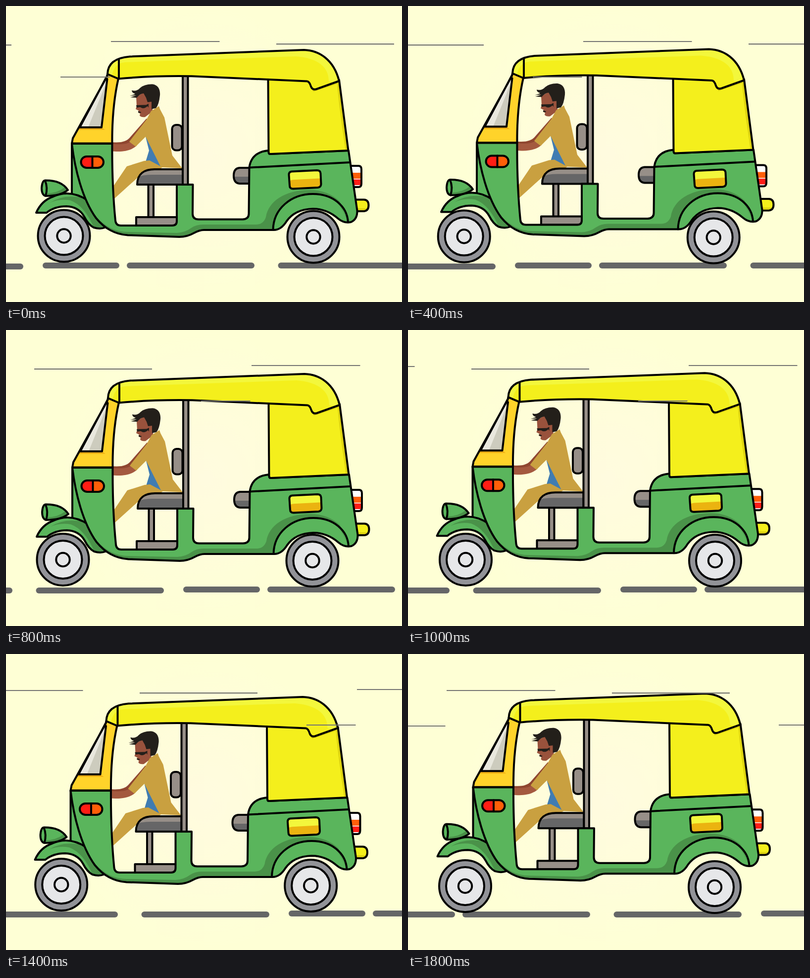
Write an HTML page that moves like this. It is 800 by 600 pixels and loops after 2000 ms.

```html
<!DOCTYPE html>
<html lang="en">
<head>
<meta charset="utf-8">
<title>Auto rickshaw</title>
<style>
  html, body { margin: 0; width: 100%; height: 100%; overflow: hidden; background: #feffd5; }
  svg { display: block; width: 800px; height: 600px; }
  .ink { stroke: #000; stroke-width: 4; stroke-linejoin: round; stroke-linecap: round; }
  .line { fill: none; }
  .green { fill: #5ab55c; }
  .moss { fill: #4a9249; }
  .yellow { fill: #f4ef1c; }
  .lemon { fill: #f3f73c; }
  .mustard { fill: #ded410; }
  .gray { fill: #978f88; }
  .dark { fill: #666667; }
  .skin { fill: #a4593f; }
  .face { fill: #99523c; }
  .shade { fill: #8f4630; }
  .khaki { fill: #c9a040; }
  .hair { fill: #231f1a; }
</style>
</head>
<body>
<svg viewBox="0 0 800 600">
  <defs>
    <radialGradient id="glow" gradientUnits="userSpaceOnUse" cx="400" cy="300" r="300">
      <stop offset="0" stop-color="#fffbdf"/>
      <stop offset="1" stop-color="#feffd5"/>
    </radialGradient>
    <path id="tail" d="M694 324H712Q718 324 718 331V360Q718 367 712 367H698Z"/>
    <path id="fender" d="M61 419Q72 394 96 386Q130 371 165 394L200 449Q190 453 177 449Q166 443 158 427Q147 407 122 406Q98 406 82 419Z"/>
    <path id="lamp" d="M79 353.500Q112 353 125 373Q110 385 80 385Q72 383 72 369Q73 354 79 353.500Z"/>
    <path id="seat" d="M265 362Q265 346 275 338Q284 331 300 331H357V362Z"/>
    <path id="bench" d="M494 328H472Q460 329 460 344T472 360H494Z"/>
    <path id="hull" d="M133 279H214.500Q214 365 221 435Q222 445 232 445H336Q345 445 345 436V362H377.500L377 421Q377 432.500 389 432.500H478Q490.500 432 490.500 421L491.500 327Q496 296 530 293L532 300L692 293L709.500 415Q710 432 697 438Q683 441 671 431Q648 411 620 411Q584 412 567 436Q556 454 541 454H400Q391 454 380 460Q366 468 350 468L246 464.500Q208 462 182 430C154 391 139 330 133 279Z"/>
    <path id="hatch" d="M577 335.500L628 333Q635 333 635.500 339L636.500 361Q636.500 367 630 368L580 370.500Q573 370.500 573 364L571.500 342Q571.500 336 577 335.500Z"/>
    <rect id="signal" x="151.500" y="305" width="45.500" height="23" rx="11.500"/>
    <path id="cover" d="M529.500 146L530.500 296Q530.500 300 534 300L691.500 293L673 150Z"/>
    <path id="roof" d="M205 138Q206 106 250 102.500L602 89C632 90 662 108 673 152L627 168.500Q619 171 616 163Q613 153 608 152.500L375 142.300Q298 141 227 147.500Z"/>
    <clipPath id="inTail"><use href="#tail"/></clipPath>
    <clipPath id="inFender"><use href="#fender"/></clipPath>
    <clipPath id="inLamp"><use href="#lamp"/></clipPath>
    <clipPath id="inSeat"><use href="#seat"/></clipPath>
    <clipPath id="inBench"><use href="#bench"/></clipPath>
    <clipPath id="inHull"><use href="#hull"/></clipPath>
    <clipPath id="inHatch"><use href="#hatch"/></clipPath>
    <clipPath id="inSignal"><use href="#signal"/></clipPath>
    <clipPath id="inRoof"><use href="#roof"/></clipPath>
    <g id="wheel" class="ink">
      <circle r="52.500" fill="#929398"/>
      <circle r="38.500" fill="#e6e7e9"/>
      <circle r="13.700" fill="#e6e7e9"/>
    </g>
  </defs>
  <rect width="800" height="600" fill="url(#glow)"/>
  <g id="road" stroke="#656667" stroke-width="12" stroke-linecap="round"></g>

  <g id="cab">
    <!-- tail lights -->
    <use href="#tail" fill="#fff"/>
    <g clip-path="url(#inTail)">
      <path d="M690 338H720V350H690Z" fill="#ff5f0a"/>
      <path d="M690 351.500H720V363H690Z" fill="#ff1d17"/>
    </g>
    <use href="#tail" class="ink line"/>
    <path class="ink yellow" d="M704 392.500H723Q732.500 393 732.500 404T723 416H704Z"/>
    <path class="mustard" d="M709 410H729Q726 414 722 414H709Z"/>

    <!-- nose, fender and head lamp -->
    <path class="ink green" d="M133 279V384L165 396V330Z"/>
    <use href="#fender" class="green"/>
    <path class="moss" clip-path="url(#inFender)" d="M88 399Q112 383 145 387L170 392L205 455H180Q160 405 130 394Q108 390 88 399Z"/>
    <use href="#fender" class="ink line"/>
    <use href="#lamp" class="green"/>
    <path class="moss" clip-path="url(#inLamp)" d="M82 380Q104 379 118 368L128 373L110 388H80Z"/>
    <use href="#lamp" class="ink line"/>
    <path class="ink line" stroke-width="3" d="M79 354Q85 369 80 385"/>

    <!-- driver -->
    <path d="M282 265L301 292L314 328L282 316L289 293Z" fill="#407cb2"/>
    <path class="khaki" d="M215 368L244 325L279 314L290 313L316 327L300 337L268 346L215 394Z"/>
    <path class="skin" d="M212 276C235 279 244 275 252 267L264 283C250 296 228 296 212 294Z"/>
    <path class="shade" d="M212 276C234 278 243 274 249 268L284 228L287 233L256 273Q240 284 212 279Z"/>
    <path class="face" d="M263 184L281 174L296 192V214L289 219L281 225Q273 226 270 222L271 218L267 216L268 212L262 209L264 203Z"/>
    <path class="khaki" d="M293 213L309 203L311 209L320 226L336 303L356 329L313 327L282 265L262 285L249 275L284 230Z"/>
    <path class="hair" d="M254 171Q264 174 271 166Q280 158 296 158.500C307 160 312 169 311 181Q309 200 303 207L294 209V194L286 195L283 186L278 177Q270 178 264 186L251 185Q259 183 263 181L250 182Q258 180 261 178Q254 176 254 171Z"/>
    <path class="hair" d="M263 201L283 200.500L288 198L288 206L286 203Q281 208 275 207L271 205L264 206Z"/>
    <path class="hair" d="M267 213L273 215L272 217L267 216Z"/>

    <!-- front seat and pillar -->
    <path class="ink gray" d="M287.500 360H298V430H287.500Z"/>
    <path class="ink gray" d="M263 428H346V445H263Z"/>
    <use href="#seat" class="gray"/>
    <path class="dark" clip-path="url(#inSeat)" d="M260 350Q272 342 295 342H360V366H260Z"/>
    <use href="#seat" class="ink line"/>
    <rect class="ink gray" x="335.500" y="241" width="20" height="51.500" rx="8"/>
    <path class="ink gray" d="M357 140H367.500V362H357Z"/>

    <!-- rear bench -->
    <use href="#bench" class="gray"/>
    <path class="dark" clip-path="url(#inBench)" d="M455 346H496V364H455Z"/>
    <use href="#bench" class="ink line"/>

    <!-- hull -->
    <use href="#hull" class="green"/>
    <path class="moss" clip-path="url(#inHull)" d="M180 424Q208 458 246 458L345 460Q362 459 374 450Q384 443 398 443H505Q520 443 525 428C530 396 563 373 614 373Q650 373 674 396L691 438L685 425Q668 381 620 381C576 381 540 411 539 456L400 480H220Z"/>
    <use href="#hull" class="ink line"/>
    <path class="ink line" d="M491.500 327.500L694 317M539.500 454C540 411 576 381 620 381C661 381 689 406 691 438"/>
    <use href="#hatch" class="lemon"/>
    <path clip-path="url(#inHatch)" d="M570 358Q572 352 585 352L640 349V374H570Z" fill="#ebb310"/>
    <use href="#hatch" class="ink line"/>

    <!-- turn signal -->
    <use href="#signal" fill="#ff5f08"/>
    <path clip-path="url(#inSignal)" d="M150 304H174.500V330H150Z" fill="#ff1d14"/>
    <use href="#signal" class="ink line"/>
    <path class="ink line" d="M174.500 305V328"/>

    <!-- windscreen -->
    <path d="M205 138L227 147Q214 204 214.500 278.500H133L135 268L204 143Z" fill="#ffd32a"/>
    <path d="M147 247H194L200 251H145Z" fill="#efae12"/>
    <path d="M204 143L149 246H193L205 150Z" fill="#e9e8de"/>
    <path d="M204 152L166 246H193Z" fill="#cdccbe"/>
    <path class="ink line" d="M205 140L149 246H193L204.500 148M205 138L227 147Q214 204 214.500 278.500H133L135 268L204 143Z"/>

    <!-- rear cover -->
    <use href="#cover" class="yellow"/>
    <path class="mustard" d="M616 164L621 174L669 158Q672 200 686 293H691L673 150Z"/>
    <use href="#cover" class="ink line"/>

    <!-- roof -->
    <use href="#roof" class="yellow"/>
    <path class="lemon" clip-path="url(#inRoof)" d="M200 142V95L610 82L680 110V158L652 153Q652 108 586 102L240 114Q218 116 214 142Z"/>
    <use href="#roof" class="ink line"/>
    <path class="ink line" d="M228 108V147"/>
  </g>

  <g id="wheels">
    <use href="#wheel" x="117" y="466"/>
    <use href="#wheel" x="621" y="468"/>
  </g>
  <g id="wind" stroke="#757573" stroke-width="2.200"></g>
</svg>
<script>
  const $ = id => document.getElementById(id);
  const STEP = 200, SHIFT = 71, TILE = 773;

  // [cab x, cab y, wheels x, wheels y] for each step
  const bounce = [
    [0, 0, 0, 0], [7, -2.500, -5, 2.300], [6, -1.500, -3.800, 1], [5, 0, -3.500, -0.500], [1, 0, -2, -0.500],
    [-2.500, -1.800, -0.500, -0.500], [-1.500, -8.800, -4.500, 3], [-2.500, -2, -5.300, 1.500], [4.600, -1, -4, 0], [-1.500, -8.800, -1.500, 4.500]
  ];

  // Each row is [x1, x2, y]; a second tile follows on the left.
  function strips(group, rows, inset) {
    for (const [dx, dy] of [[0, 0], [-TILE, 2]])
      for (const [a, b, y] of rows) {
        const line = document.createElementNS('http://www.w3.org/2000/svg', 'line');
        const at = { x1: a + dx + inset, x2: b + dx - inset, y1: y + dy, y2: y + dy };
        for (const k in at) line.setAttribute(k, at[k]);
        group.append(line);
      }
  }
  strips($('road'), [[74, 229, 526], [244, 502, 526], [549.500, 808, 526]], 6);
  strips($('wind'), [[212, 431.500, 72], [546, 784, 77.200], [110, 209.500, 144]], 0);

  const move = (id, x, y) => $(id).setAttribute('transform', `translate(${x} ${y})`);

  function draw(now) {
    const i = Math.floor(now / STEP) % bounce.length;
    const [cx, cy, wx, wy] = bounce[i];
    move('cab', cx, cy);
    move('wheels', wx, wy);
    move('road', i * SHIFT, 0);
    move('wind', i * SHIFT, 0);
  }

  let start;
  function tick(now) {
    start ??= now;
    draw(now - start);
    requestAnimationFrame(tick);
  }
  draw(0);
  requestAnimationFrame(tick);
</script>
</body>
</html>
```
